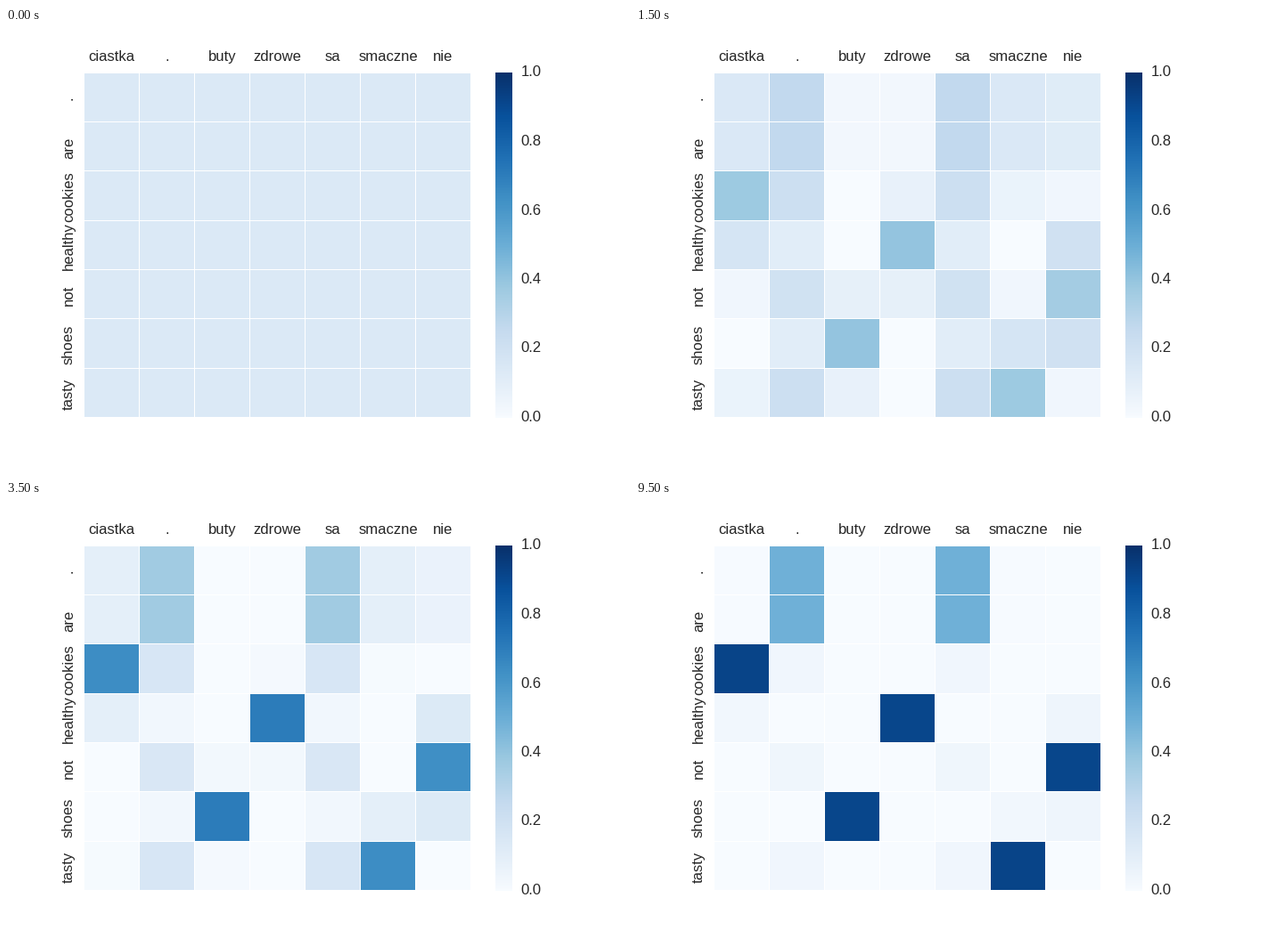
Recreate the animation shown at these times as a matplotlib script. Size 700 px wide and 500 px high, loop 10000 ms.

```python
import math

import matplotlib.pyplot as plt
import numpy as np
from matplotlib.animation import FuncAnimation
from matplotlib.patches import Rectangle

WIDTH, HEIGHT, DPI = 700, 500, 100
FRAMES, INTERVAL = 20, 500
LEFT, RIGHT, TOP, BOTTOM = 87.5, 521.5, 50, 437.5
BAR_LEFT, BAR_RIGHT = 549, 568
LABEL_PAD = 9.7
INK = "0.15"

ENGLISH = [".", "are", "cookies", "healthy", "not", "shoes", "tasty"]
POLISH = ["ciastka", ".", "buty", "zdrowe", "sa", "smaczne", "nie"]
CORPUS = [
    ("cookies are tasty .", "ciastka sa smaczne ."),
    ("cookies are not healthy .", "ciastka nie sa zdrowe ."),
    ("shoes are not tasty .", "buty nie sa smaczne ."),
]
PAIRS = [
    np.ix_([ENGLISH.index(w) for w in en.split()],
           [POLISH.index(w) for w in pl.split()])
    for en, pl in CORPUS
]


def em_step(table):
    """One round of expectation maximisation for IBM Model 1."""
    counts = np.zeros_like(table)
    for pair in PAIRS:
        block = table[pair]
        counts[pair] += block / block.sum(axis=0)
    return counts / counts.sum(axis=1, keepdims=True)


tables = [np.full((len(ENGLISH), len(POLISH)), 1 / len(POLISH))]
while len(tables) < FRAMES:
    tables.append(em_step(tables[-1]))

plt.rcParams["font.family"] = "Liberation Sans"
plt.rcParams["font.size"] = 12
cmap = plt.get_cmap("Blues")

fig = plt.figure(figsize=(WIDTH / DPI, HEIGHT / DPI), dpi=DPI, facecolor="white")
ax = fig.add_axes([0, 0, 1, 1])
ax.axis("off")

x_edges = np.linspace(LEFT, RIGHT, len(POLISH) + 1)
y_edges = np.linspace(TOP, BOTTOM, len(ENGLISH) + 1)


def add_cell(row, col):
    """Fill a cell, leaving a one-pixel white rule on every edge."""
    x0, x1 = math.floor(x_edges[col]) + 1, math.floor(x_edges[col + 1])
    y0, y1 = math.floor(y_edges[row]) + 1, math.floor(y_edges[row + 1])
    return ax.add_patch(Rectangle((x0, y0), x1 - x0, y1 - y0,
                                  linewidth=0, antialiased=False))


cells = [add_cell(r, c) for r in range(len(ENGLISH)) for c in range(len(POLISH))]

for word, x in zip(POLISH, (x_edges[:-1] + x_edges[1:]) / 2):
    ax.text(x, TOP - LABEL_PAD, word, color=INK, ha="center", va="bottom")
for word, y in zip(ENGLISH, (y_edges[:-1] + y_edges[1:]) / 2):
    ax.text(LEFT - LABEL_PAD, y + 1.5, word, color=INK, rotation=90,
            ha="right", va="center")

ax.imshow(np.linspace(1, 0, 256)[:, None], cmap=cmap, vmin=0, vmax=1,
          extent=(BAR_LEFT, BAR_RIGHT, 438, TOP), aspect="auto",
          interpolation="nearest")
for value in np.linspace(0, 1, 6):
    ax.text(BAR_RIGHT + LABEL_PAD, BOTTOM + (TOP - BOTTOM) * value,
            f"{value:.1f}", color=INK, ha="left", va="center")

ax.set_xlim(0, WIDTH)
ax.set_ylim(HEIGHT, 0)


def update(frame):
    for cell, value in zip(cells, tables[frame].flat):
        cell.set_facecolor(cmap(value))
    return cells


animation = FuncAnimation(fig, update, frames=FRAMES, interval=INTERVAL,
                          repeat=True, repeat_delay=0)
plt.show()
```
